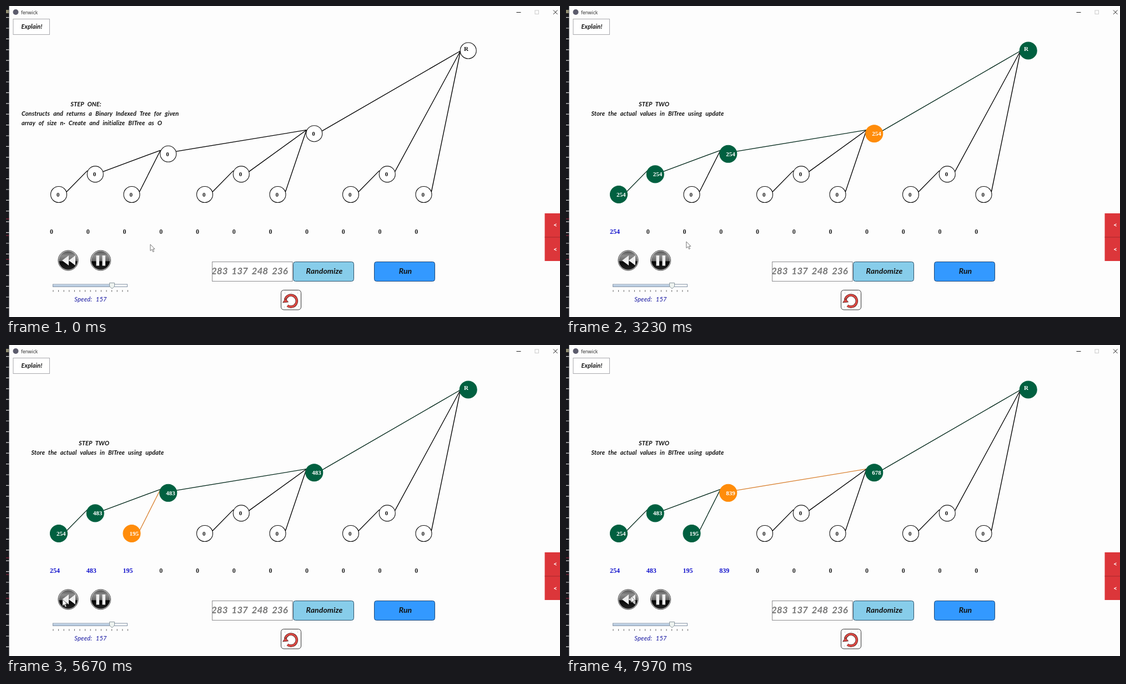
Recreate the animation shown at these times as an HTML page. Size 998 by 561 pixels, loop 8 s.

```html
<!DOCTYPE html>
<html lang="en">
<head>
<meta charset="utf-8">
<title>fenwick</title>
<style>
  html, body { margin: 0; width: 100%; height: 100%; overflow: hidden; background: #fdfdfd; }
  svg { display: block; width: 100%; height: 100%; }
  .hand { font: italic bold 11px Lato, sans-serif; word-spacing: 3.5px; letter-spacing: .1px; fill: #111; }
  .button { font-size: 14px; }
  .speed { font-weight: normal; letter-spacing: .3px; fill: #1414a0; }
  .input { font-size: 17px; word-spacing: 3px; letter-spacing: 0; fill: #777; }
  .mid { text-anchor: middle; }
  .num { font: bold 11px "Liberation Serif", serif; }
  .cell { font: bold 12px "Liberation Serif", serif; }
  .edge { fill: none; stroke-width: 1.35; }
</style>
</head>
<body>
<svg viewBox="0 0 998 561" xmlns="http://www.w3.org/2000/svg">
  <defs>
    <linearGradient id="gloss" x2="0" y2="1">
      <stop offset="0" stop-color="#555"/>
      <stop offset=".25" stop-color="#8c8c8c"/>
      <stop offset=".52" stop-color="#666"/>
      <stop offset=".56" stop-color="#050505"/>
      <stop offset="1" stop-color="#222"/>
    </linearGradient>
    <clipPath id="field"><rect x="372" y="462" width="143" height="34"/></clipPath>
    <g id="disc">
      <circle r="18" fill="#fff" stroke="#333"/>
      <circle r="16.8" fill="url(#gloss)"/>
    </g>
  </defs>

  <rect width="998" height="561" fill="#fdfdfd"/>

  <!-- Desktop edge -->
  <rect width="5.6" height="561" fill="#17181d"/>
  <path d="M2.8 20V561" stroke="#d8d8d8" stroke-width="5.6" stroke-dasharray="1.2 18.2"/>
  <path d="M0 384h6M0 414h5M0 457h6" stroke="#b02a48"/>
  <path d="M0 10h5" stroke="#8d8a70" stroke-width="6"/>

  <!-- Title bar -->
  <circle cx="17.5" cy="11" r="5" fill="#5b5b6c"/>
  <text x="27" y="14.5" font-family="Open Sans, sans-serif" font-size="8.5" fill="#222">fenwick</text>
  <path d="M919.5 11.5h8M986 7.5l7.5 7.5M993.5 7.5l-7.5 7.5" stroke="#222" fill="none"/>
  <rect x="953" y="8" width="6.5" height="6.5" fill="none" stroke="#ccc"/>

  <rect x="13" y="23.5" width="65.5" height="28" fill="#fff" stroke="#a9a9ad"/>
  <text class="hand mid" x="46.5" y="41">Explain!</text>

  <g id="stepOne">
    <text class="hand mid" x="144" y="180.5">STEP ONE:</text>
    <text class="hand" x="28" y="197.5">Constructs and returns a Binary Indexed Tree for given</text>
    <text class="hand" x="28" y="214.5">array of size n· Create and initialize BITree as O</text>
  </g>
  <g id="stepTwo">
    <text class="hand mid" x="158.5" y="180.5">STEP TWO</text>
    <text class="hand mid" x="165" y="197.5">Store the actual values in BITree using update</text>
  </g>

  <g id="edges"></g>
  <g id="nodes"></g>
  <g id="cells"></g>

  <!-- Side tabs -->
  <path d="M970.5 374H998V460H970.5Z" fill="#dc363a"/>
  <path d="M970.5 417H998" stroke="#a9282c"/>
  <g font-family="Lato, sans-serif" font-size="12" font-weight="bold" fill="#fff">
    <text x="986" y="399">&lt;</text>
    <text x="986" y="442.5">&lt;</text>
  </g>

  <!-- Playback -->
  <use href="#disc" x="112" y="459"/>
  <path d="M101 459l12-9v18ZM113 459l12-9v18Z" fill="#eee"/>
  <use href="#disc" x="170.5" y="459"/>
  <path d="M162.5 450h5.5v18.5h-5.5zM173.5 450h5.5v18.5h-5.5z" fill="#eee"/>

  <!-- Speed slider -->
  <rect x="84.5" y="502" width="134" height="4.5" fill="#f4f6f8" stroke="#8796a8"/>
  <rect x="85" y="502.5" width="104" height="3.5" fill="#bccfe3"/>
  <path d="M186.5 499.5h9v6l-4.5 4.5l-4.5-4.5Z" fill="#eef3f0" stroke="#8b98a0"/>
  <path d="M84.5 514H220" stroke="#555" stroke-width="3" stroke-dasharray="1 8.6"/>
  <text class="hand speed mid" x="152.5" y="532.5">Speed: 157</text>

  <!-- Input and buttons -->
  <rect x="371.5" y="461.5" width="144.5" height="35" fill="#fff" stroke="#8c8c90"/>
  <g clip-path="url(#field)">
    <text class="hand input" x="370" y="484">283 137 248 236</text>
  </g>
  <rect x="517.5" y="461.5" width="109" height="35" rx="4" fill="#87cdea" stroke="#30536b"/>
  <text class="hand button mid" x="573.5" y="483">Randomize</text>
  <rect x="663.5" y="461.5" width="109" height="35" rx="4" fill="#3399ff" stroke="#1d4676"/>
  <text class="hand button mid" x="719.5" y="483">Run</text>

  <!-- Reset -->
  <rect x="495.5" y="512.5" width="36" height="35.5" rx="5" fill="#fff" stroke="#333"/>
  <g fill="none">
    <path id="turn" d="M507 540.5A10.5 10.5 0 1 0 503 530" stroke="#4a2020" stroke-width="4.6"/>
    <path d="M507 540.5A10.5 10.5 0 1 0 503 530" stroke="#dd4a44" stroke-width="3.2"/>
    <path d="M498.5 535l5-7l5 6Z" fill="#dd4a44" stroke="#4a2020" stroke-width=".8"/>
    <path d="M502 518h1M525 518h1M527 542h1M501 543h1M514 516h1" stroke="#999"/>
  </g>

  <path id="cursor" d="M0 0V11.5L2.8 9L4.8 13.5L6.7 12.6L4.7 8.3H8Z" fill="#fff" stroke="#666" stroke-width=".9"/>
</svg>

<script>
const LOOP = 8000, FIRST_STEP = 475, STEP = 695, COUNT = 11;
const GREEN = "#006040", DARK_GREEN = "#02281a", ORANGE = "#ff8c0a";
const values = [254, 229, 195, 161];
const $ = id => document.getElementById(id);

function set(el, attrs) {
  for (const key in attrs) el.setAttribute(key, attrs[key]);
  return el;
}

function add(parent, tag, attrs) {
  const el = document.createElementNS("http://www.w3.org/2000/svg", tag);
  return parent.appendChild(set(el, attrs));
}

const lowBit = i => i & -i;
const parentOf = i => i + lowBit(i) > COUNT ? 0 : i + lowBit(i);
const centre = i => i
  ? { x: 95 + 65.75 * (i - 1), y: 340 - 36.6 * Math.log2(lowBit(i)) }
  : { x: 832.7, y: 80.5 };

// Node 0 is the root.
const nodes = [];
for (let i = 0; i <= COUNT; i++) {
  const { x, y } = centre(i), node = {};
  if (i) {
    const up = parentOf(i), p = centre(up);
    const endY = p.y + (up ? -6.5 : 0.5);
    node.edge = add($("edges"), "path", {
      class: "edge", d: `M${x + 13.8} ${y - 4.5}L${p.x - 14} ${endY}`
    });
    node.cell = add($("cells"), "text", { class: "cell", x: 79 + 65.73 * (i - 1), y: 411 });
  }
  node.disc = add($("nodes"), "circle", { cx: x, cy: y });
  node.label = add($("nodes"), "text", { class: "num", x: i ? x - 4 : 825, y: i ? y + 4 : 80.5 });
  nodes.push(node);
}

// Each inserted value climbs from its own node to the top of its chain.
const steps = [];
values.forEach((value, k) => {
  for (let i = k + 1; i; i = parentOf(i)) steps.push({ i, value, first: i === k + 1 });
});

function drawTree(current) {
  const sums = Array(COUNT + 1).fill(0);
  const stored = Array(COUNT + 1).fill(0);
  const visited = new Set();
  steps.slice(0, current + 1).forEach(({ i, value, first }) => {
    sums[i] += value;
    if (first) stored[i] = sums[i];
    visited.add(i);
    if (!parentOf(i)) visited.add(0);
  });
  const active = current < 0 ? -1 : steps[current].i;

  nodes.forEach((node, i) => {
    const on = visited.has(i), hot = i === active;
    const fill = hot ? ORANGE : on ? GREEN : "#fff";
    set(node.disc, { r: on ? 15.5 : 14.5, fill, stroke: on ? fill : "#111", "stroke-width": 1.1 });
    node.label.textContent = i ? sums[i] : "R";
    set(node.label, { fill: on ? "#fff" : "#111" });
    if (!i) return;
    const line = hot && parentOf(i) ? "#d98232" : on ? DARK_GREEN : "#000";
    set(node.edge, { stroke: line });
    node.cell.textContent = stored[i];
    set(node.cell, { fill: stored[i] ? "#1414cc" : "#222" });
  });
  $("stepOne").style.display = current < 0 ? "" : "none";
  $("stepTwo").style.display = current < 0 ? "none" : "";
}

// Pointer path: time, x, y
const route = [
  [0, 260, 430], [2800, 260, 430], [3230, 217, 425], [3750, 110, 457],
  [4900, 110, 457], [5400, 102, 459], [5800, 102, 459], [6400, 117, 453], [LOOP, 117, 453]
];

function moveCursor(t) {
  const k = route.findIndex(point => point[0] > t);
  const [t0, x0, y0] = route[k - 1], [t1, x1, y1] = route[k];
  const f = (t - t0) / (t1 - t0);
  set($("cursor"), { transform: `translate(${x0 + (x1 - x0) * f} ${y0 + (y1 - y0) * f})` });
}

let shown;
function frame() {
  const t = performance.now() % LOOP;
  const current = Math.min(Math.floor((t - FIRST_STEP) / STEP), steps.length - 1);
  if (current !== shown) drawTree(shown = current);
  moveCursor(t);
  requestAnimationFrame(frame);
}
frame();
</script>
</body>
</html>
```
